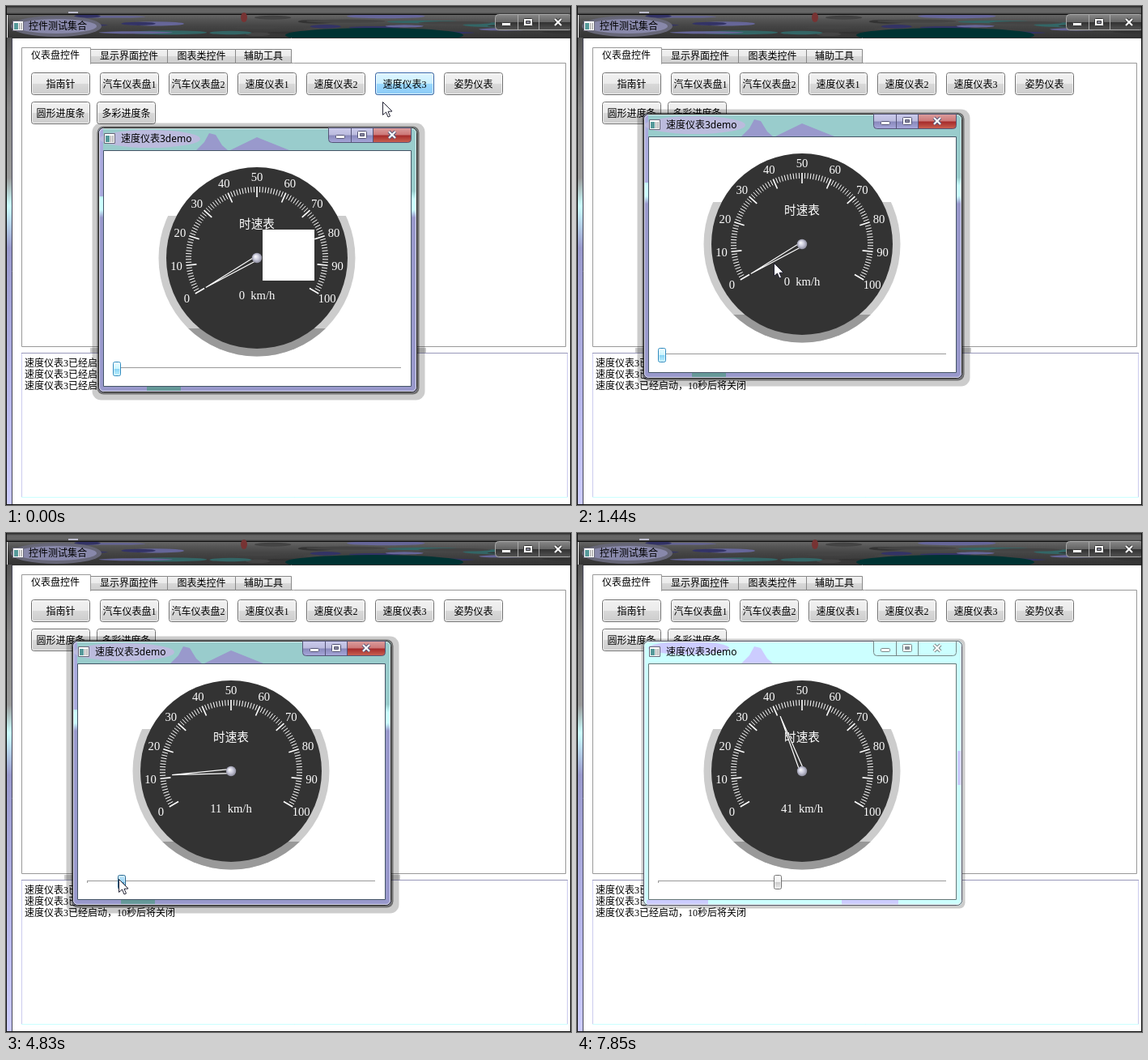
Recreate the animation shown at these times as an HTML page with a canvas. Size 698x616 px, loop 8 s.

```html
<!DOCTYPE html>
<html lang="zh-CN">
<head>
<meta charset="utf-8">
<style>
html, body { margin: 0; width: 100%; height: 100%; overflow: hidden; background: #fff; }
canvas { display: block; }
</style>
</head>
<body>
<canvas id="stage" width="698" height="616"></canvas>
<script>
const ctx = document.getElementById('stage').getContext('2d');
const SONG = '"Liberation Serif", "Noto Sans CJK SC", "Noto Sans CJK", serif';
const SANS = '"Noto Sans", "Noto Sans CJK SC", "Noto Sans CJK", sans-serif';

// The picture is refreshed in steps, like a slow screen recording.
const LOOP = 8000, STEP = 339, LEAD_IN = 288;
const DRAG_START = 8, DRAG_END = 23, BLUR = 24;

// Key points: step, then the values reached at that step
const WINDOW_PATH = [[3, 114, 150], [4, 89, 139], [5, 82, 133]];
const POINTER_PATH = [[0, 465, 118], [2, 387, 170], [4, 326, 154], [5, 243, 317], [6, 117, 441], [8, 106, 430]];
const SPEED_PATH = [[7, 0], [8, 1], [11.5, 92], [12, 92], [15, 11], [16, 20], [17, 91], [18, 39], [19, 28], [20, 89], [22, 41]];

function along(path, step) {
  const next = path.findIndex(key => key[0] > step);
  if (next === 0) return path[0].slice(1);
  if (next < 0) return path.at(-1).slice(1);
  const [from, ...a] = path[next - 1], [to, ...b] = path[next];
  return a.map((v, i) => v + (b[i] - v) * (step - from) / (to - from));
}

const speedAt = step => Math.round(along(SPEED_PATH, step)[0]);
const handleX = speed => 23 + 3.5 * speed;

// While dragging, the pointer runs a little ahead of the handle.
function pointerAt(step, windowX) {
  if (step < DRAG_START) return along(POINTER_PATH, step);
  const lead = .26 * (speedAt(step + 1) - speedAt(step - 1));
  return [windowX + handleX(speedAt(step)) + lead, 426 + 7 * Math.cos((step - 12) * Math.PI / 6.5)];
}

function seeded(seed) {
  return () => (seed = seed * 16807 % 2147483647) / 2147483647;
}

function rect(x, y, w, h, fill) {
  ctx.fillStyle = fill;
  ctx.fillRect(x, y, w, h);
}

function box(x, y, w, h, fill, stroke, radius = 0) {
  ctx.beginPath();
  ctx.roundRect(x + .5, y + .5, w - 1, h - 1, radius);
  if (fill) { ctx.fillStyle = fill; ctx.fill(); }
  if (stroke) { ctx.lineWidth = 1; ctx.strokeStyle = stroke; ctx.stroke(); }
}

function disc(x, y, r, fill, ry = r) {
  ctx.beginPath();
  ctx.ellipse(x, y, r, ry, 0, 0, 7);
  ctx.fillStyle = fill;
  ctx.fill();
}

function polygon(points, fill, stroke, width = 1) {
  ctx.beginPath();
  points.forEach(([x, y]) => ctx.lineTo(x, y));
  ctx.closePath();
  ctx.fillStyle = fill;
  ctx.fill();
  if (stroke) { ctx.strokeStyle = stroke; ctx.lineWidth = width; ctx.stroke(); }
}

function line(x1, y1, x2, y2, color, width = 1) {
  ctx.beginPath();
  ctx.moveTo(x1, y1);
  ctx.lineTo(x2, y2);
  ctx.strokeStyle = color;
  ctx.lineWidth = width;
  ctx.stroke();
}

// Vertical gradient; stops are [offset, color] pairs.
function shade(y1, y2, ...stops) {
  const g = ctx.createLinearGradient(0, y1, 0, y2);
  stops.forEach(([at, color]) => g.addColorStop(at, color));
  return g;
}

// Glossy two-part gradient
function gloss(y, h, top, middle, bottom, end = bottom) {
  return shade(y, y + h, [0, top], [.48, middle], [.52, bottom], [1, end]);
}

// y is the visual middle of the line
function text(str, x, y, { size = 12, color = '#000', align = 'left', font = SONG } = {}) {
  ctx.font = `${size}px ${font}`;
  ctx.textAlign = align;
  ctx.fillStyle = color;
  ctx.fillText(str, x, y + size * .36);
}

function appIcon(x, y) {
  box(x, y, 14, 13, '#fff', '#667');
  rect(x + 2, y + 3, 5, 8, '#599');
  rect(x + 8, y + 3, 1, 8, '#999');
  rect(x + 10, y + 3, 2, 8, '#bbb');
}

function captionGlyphs(minX, maxX, closeX, y, edge) {
  box(minX - 6, y - 1, 12, 5, '#fff', edge, 1);
  box(maxX - 6, y - 6, 12, 10, '#fff', edge, 1);
  box(maxX - 3, y - 3, 6, 4, '#889', edge);
  for (const [width, color] of [[4, edge], [2.2, '#fff']]) {
    line(closeX - 4, y - 5, closeX + 4, y + 3, color, width);
    line(closeX + 4, y - 5, closeX - 4, y + 3, color, width);
  }
}

function button(label, x, y, hot = 0) {
  box(x, y, 73, 28, gloss(y, 28, '#f2f2f2', '#ebebeb', '#d8d8d8', '#ccc'), '#707070', 3);
  if (hot) {
    ctx.globalAlpha = hot;
    box(x, y, 73, 28, gloss(y, 28, '#dff6ff', '#ccf0ff', '#99d8ff', '#8ccaf5'), '#3366aa', 3);
    ctx.globalAlpha = 1;
  }
  box(x + 1, y + 1, 71, 26, null, 'rgba(255,255,255,.7)', 2);
  text(label, x + 36.5, y + 14.5, { align: 'center' });
}

function titleBar() {
  rect(0, 0, 698, 10, shade(0, 10, [0, '#222'], [.3, '#666'], [.8, '#666'], [1, '#333']));
  rect(2, 11, 696, 28, shade(11, 39, [0, '#666'], [.2, '#555'], [.5, '#444'], [1, '#333']));
  ctx.save();
  ctx.beginPath();
  ctx.rect(2, 11, 696, 28);
  ctx.clip();
  const random = seeded(11);
  const tints = ['#336', '#366', '#333', '#669', '#444'];
  for (let i = 0; i < 36; i++) {
    disc(100 + random() * 600, 12 + random() * 26, 15 + random() * 35, tints[i % 5], 1 + random() * 2);
  }
  disc(455, 36, 110, '#033', 9);
  disc(62, 25, 56, '#667', 13);
  disc(62, 25, 50, '#88a', 9);
  ctx.restore();
  line(0, 10.5, 698, 10.5, '#111');
  rect(77, 7, 12, 2, '#bbc');
  disc(294, 14, 4, '#733', 6);
  appIcon(8, 18);
  text('控件测试集合', 28, 24.5, { font: SANS });

  box(604, 10, 96, 20, gloss(10, 20, '#888', '#666', '#333', '#555'), '#aaa', 4);
  line(632.5, 11, 632.5, 29, '#aaa');
  line(658.5, 11, 658.5, 29, '#aaa');
  captionGlyphs(618, 645, 682, 21, '#333');
}

function mainWindow(hot) {
  rect(0, 0, 698, 616, '#fff');
  titleBar();
  rect(1, 39, 7, 577, shade(39, 616, [0, '#555'], [.15, '#888'], [.3, '#999'], [.36, '#cff'], [.45, '#99c'], [1, '#ccf']));
  rect(0, 0, 1, 616, '#111');
  line(7.5, 39, 7.5, 616, '#445');
  line(7, 39.5, 698, 39.5, '#333');

  box(19, 70, 673, 351, '#fff', '#999');
  let tabX = 104;
  for (const [label, width] of [['显示界面控件', 96], ['图表类控件', 85], ['辅助工具', 70]]) {
    box(tabX, 53, width, 18, gloss(53, 18, '#f2f2f2', '#ebebeb', '#d8d8d8', '#ccc'), '#888');
    text(label, tabX + width / 2, 62, { align: 'center' });
    tabX += width - 1;
  }
  box(19, 51, 86, 21, '#fff', '#999');
  rect(20, 70, 84, 3, '#fff');
  text('仪表盘控件', 31, 61);

  ['指南针', '汽车仪表盘1', '汽车仪表盘2', '速度仪表1', '速度仪表2', '速度仪表3', '姿势仪表']
    .forEach((label, i) => button(label, 31 + 85 * i, 82, label === '速度仪表3' ? hot : 0));
  button('圆形进度条', 31, 118);
  button('多彩进度条', 112, 118);

  box(19, 428, 675, 179, '#fff', '#ccccee');
  line(19, 428.5, 694, 428.5, '#9999bb');
  line(19, 606.5, 694, 606.5, '#cff');
  for (let i = 0; i < 3; i++) text('速度仪表3已经启动，10秒后将关闭', 23, 441 + 14 * i);

  rect(697, 0, 1, 616, '#111');
  rect(0, 615, 698, 1, '#111');
}

// The demo window is drawn around its own top left corner.
function frame(active) {
  const W = 394, H = 327;
  const hill = active ? '#99c' : '#ccf';
  if (active) {
    box(-8, -6, W + 18, H + 16, 'rgba(0,0,0,.2)', null, 11);
    box(-2, -2, W + 5, H + 5, 'rgba(0,0,0,.45)', null, 8);
  } else {
    box(-3, -3, W + 7, H + 7, 'rgba(0,0,0,.2)', null, 7);
  }
  ctx.save();
  ctx.beginPath();
  ctx.roundRect(0, 0, W, H, 6);
  ctx.clip();
  rect(0, 0, W, H, active
    ? shade(0, H, [.24, '#9cc'], [.27, '#cff'], [.31, '#cff'], [.34, '#99c'])
    : '#cff');
  polygon([[121, 28], [131, 18], [137, 7], [145, 9], [153, 22], [160, 28]], hill);
  if (active) {
    polygon([[163, 28], [196, 12], [236, 28]], hill);
    rect(0, 0, 6, 85, '#aad');
    rect(60, 320, 42, 5, '#699');
    disc(64, 14, 62, '#bbd', 11);
  } else {
    disc(56, 9, 50, hill, 8);
    rect(388, 136, 6, 42, hill);
    rect(4, 320, 76, 6, hill);
    rect(245, 320, 70, 6, hill);
  }
  ctx.restore();
  box(0, 0, W, H, null, active ? '#222' : '#556', 6);
  box(1, 1, W - 2, H - 2, null, 'rgba(255,255,255,.65)', 5);
  box(6, 28, 381, 292, '#fff', active ? '#445566' : '#667777');
  appIcon(7, 7);
  text('速度仪表3demo', 28, 13.5, { font: SANS });

  const edge = active ? '#557' : '#788';
  if (active) {
    box(284, 0, 56, 19, gloss(0, 19, '#cce', '#bbd', '#88b', '#aad'), null, [0, 0, 0, 4]);
    box(339, 0, 48, 19, gloss(0, 19, '#dda0a0', '#c77', '#a52a2a', '#c65'), null, [0, 0, 4, 0]);
  }
  box(284, 0, 103, 19, null, edge, [0, 0, 4, 4]);
  line(312.5, 0, 312.5, 19, edge);
  line(339.5, 0, 339.5, 19, edge);
  captionGlyphs(299, 326, 363, 10, edge);
}

function gauge(speed) {
  const angle = v => (150 + 2.4 * v) * Math.PI / 180;
  const label = (str, x, y) => text(str, x, y, { size: 14.6, color: '#fff', align: 'center' });
  ctx.save();
  ctx.translate(196, 161);
  ctx.save();
  for (const [top, color] of [[-52, '#ccc'], [87, '#999']]) {
    ctx.beginPath();
    ctx.rect(-130, top, 260, 190);
    ctx.clip();
    disc(0, 0, 121.5, color);
  }
  ctx.restore();
  disc(0, 0, 112, '#333');

  for (let v = 0; v <= 100; v++) {
    const c = Math.cos(angle(v)), s = Math.sin(angle(v));
    const major = v % 10 === 0, inner = major ? 75 : 81;
    line(c * inner, s * inner, c * 88, s * 88, '#fff', major ? 1.6 : 1);
    if (major) label(String(v), c * 100, s * 100 - .5);
  }
  label('时速表', 0, -42);
  label(`${speed}  km/h`, 0, 46);

  ctx.save();
  ctx.rotate(angle(speed));
  polygon([[0, -2.6], [73, 0], [0, 2.6]], '#333', '#fff', 1.2);
  ctx.restore();
  const hub = ctx.createRadialGradient(-2, -2, 0, 0, 0, 6.5);
  ['#fff', '#ccd', '#889'].forEach((color, i) => hub.addColorStop(i / 2, color));
  disc(0, 0, 6.2, hub);
  ctx.restore();
}

function slider(speed, state) {
  line(18, 296.5, 374, 296.5, '#999');
  line(18.5, 296, 18.5, 299, '#999');
  const [top, middle, bottom, edge] = {
    focus: ['#f0ffff', '#ccf6ff', '#88d4f5', '#2c8abf'],
    pressed: ['#ccecff', '#99d2f2', '#4a9ccc', '#22668f'],
    idle: ['#fff', '#f0f0f0', '#ccc', '#707070']
  }[state];
  const x = Math.floor(handleX(speed)) - 5;
  box(x, 289, 10, 18, gloss(289, 18, top, middle, bottom, middle), edge, 2);
  box(x + 1, 290, 8, 16, null, 'rgba(255,255,255,.6)', 1);
}

function pointer(x, y) {
  ctx.save();
  ctx.translate(Math.round(x) + .5, Math.round(y) + .5);
  polygon([[0, 0], [0, 16], [4, 12.5], [6.5, 18.5], [9, 17.5], [6.5, 11.8], [11.5, 11.5]], '#fff', '#223');
  ctx.restore();
}

function draw(now) {
  const step = Math.floor((now % LOOP + LEAD_IN) / STEP);
  const [x, y] = along(WINDOW_PATH, step);
  const speed = speedAt(step);
  const active = step < BLUR;
  const dragging = step >= DRAG_START && step < DRAG_END;

  mainWindow(Math.max(0, 1 - step / 2));
  if (active) rect(x - 10, 422, 415, 6, '#ccc');
  ctx.save();
  ctx.translate(x, y);
  frame(active);
  gauge(speed);
  slider(speed, !active ? 'idle' : dragging ? 'pressed' : 'focus');
  if (step === 0) rect(203, 126, 64, 63, '#fff');
  ctx.restore();
  if (step < DRAG_END) pointer(...pointerAt(step, x));
}

function tick() {
  draw(performance.now());
  requestAnimationFrame(tick);
}
tick();
</script>
</body>
</html>
```
